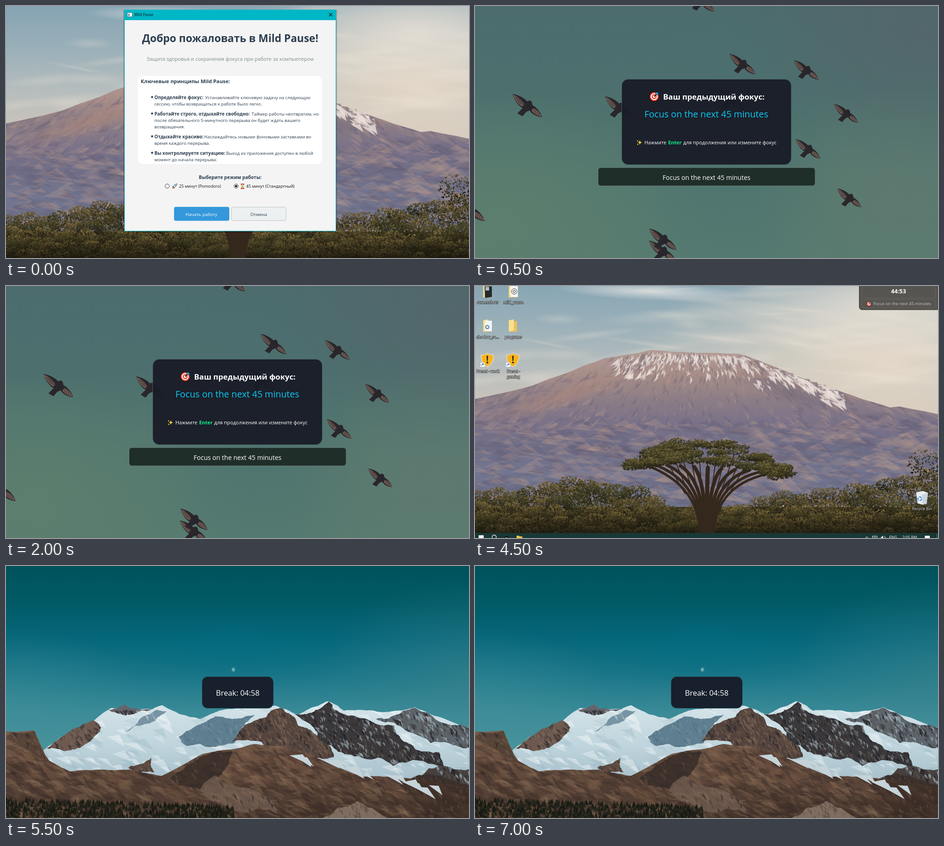
Animation of 1014 by 552 pixels, one loop 8 s. Source, as an HTML page with a canvas:

```html
<!DOCTYPE html>
<html lang="ru">
<head>
<meta charset="utf-8">
<title>Mild Pause</title>
<style>
html, body { margin: 0; width: 100%; height: 100%; overflow: hidden; background: #000; }
.scene { position: absolute; left: 0; top: 0; width: 1014px; height: 552px; overflow: hidden; }
.scene > * { position: absolute; left: 0; top: 0; }
text { font-family: "Open Sans", "Noto Sans", sans-serif; fill: #2c3e50; }
.b { font-weight: 700; }
.mid { text-anchor: middle; }
.white { fill: #fff; }
.list { font-size: 9.6px; }
.list .b { font-size: 10px; }
.icons text { font-size: 8.3px; fill: #fff; stroke: #000a; stroke-width: 1.6px; paint-order: stroke; text-anchor: middle; }
</style>
</head>
<body>

<svg width="0" height="0" style="position:absolute">
  <symbol id="dart" viewBox="0 0 24 24">
    <circle cx="11.5" cy="12.5" r="11.2" fill="#111"/>
    <circle cx="11.5" cy="12.5" r="10" fill="#f0402f"/>
    <circle cx="11.5" cy="12.5" r="6.5" fill="none" stroke="#fff" stroke-width="2.2"/>
    <circle cx="11.5" cy="12.5" r="2.8" fill="#fff"/>
    <path d="M11.5 12.5 18 6" stroke="#111" stroke-width="2"/>
    <path d="M15 8V4.500L19 1v4h4l-4 4z" fill="#35b8f0" stroke="#111"/>
  </symbol>
  <symbol id="spark" viewBox="0 0 12 12">
    <path d="M7 1 8.3 4.7 12 6 8.3 7.3 7 11 5.7 7.3 2 6 5.7 4.7z" fill="#ffdf3c"/>
    <path d="M2 1v3M.5 2.5h3M2.5 8.5v3M1 10h3" stroke="#ffdf3c"/>
  </symbol>
  <symbol id="rocket" viewBox="0 0 12 12">
    <path d="M3 6 1 8l2 .3zM6 9 4 11l-.3-2z" fill="#e2402f" stroke="#222" stroke-width=".6"/>
    <path d="M11.5.5C8 .6 5 3 3 7l2 2c4-2 6.4-5 6.5-8.5z" fill="#d9e2e8" stroke="#222" stroke-width=".8"/>
    <circle cx="8" cy="4" r="1.3" fill="#35a4e8"/>
    <path d="M3.5 8.5.8 11.2" stroke="#f2a024" stroke-width="1.6"/>
  </symbol>
  <symbol id="glass" viewBox="0 0 12 12">
    <path d="M3 1.5C3 5 5.5 5 5.5 6S3 7 3 10.5h6C9 7 6.5 7 6.5 6S9 5 9 1.5z" fill="#f8d58a" stroke="#333" stroke-width=".6"/>
    <path d="M2 1.2h8M2 10.8h8" stroke="#b8432c" stroke-width="1.8"/>
    <path d="M4 10 6 7.5 8 10z" fill="#e8992c"/>
  </symbol>
  <symbol id="folder" viewBox="0 0 22 28">
    <path d="M1 1h9l2 3h7v23H1z" fill="#e9c25c"/>
    <path d="M1 3 12 0v24L1 27z" fill="#fbe08c"/>
  </symbol>
  <symbol id="shield" viewBox="0 0 30 32">
    <path d="M15 1c4 3 9 4 13.500 4C29 17 26 26 15 31 4 26 1 17 1.500 5 6 5 11 4 15 1z" fill="#f8b31c" stroke="#d9dde0" stroke-width="1.5"/>
    <path d="M13.3 7h3.4l-.7 11h-2z" fill="#222"/><circle cx="15" cy="21.5" r="1.9" fill="#222"/>
    <path d="M0 22h9v9H0z" fill="#fff"/><path d="M2 29c0-3 1-4 4-4M4.500 23.500 7 25l-2 2" fill="none" stroke="#2469b8" stroke-width="1.2"/>
  </symbol>
</svg>

<div class="scene" data-from="0" data-art="savanna" data-shift="10">
  <svg width="1014" height="552">
    <rect x="257" y="8" width="468" height="488" fill="#0003"/>
    <rect x="259.5" y="8.5" width="463" height="484.5" fill="#f4f4f4" stroke="#00b7c6"/>
    <rect x="259" y="8" width="464" height="23" fill="#00b7c6"/>
    <rect x="265.5" y="14.5" width="11" height="9" fill="#f4f4f4" stroke="#68777c"/>
    <path d="M267 17h4v5h-4z" fill="#8298a5"/>
    <text x="281" y="22" font-size="8.2" style="fill:#0b1719">Mild Pause</text>
    <path d="M707.5 15.5l7 7m0-7l-7 7" stroke="#111" stroke-width="1.1"/>

    <text class="b mid" x="491" y="79" font-size="23">Добро пожаловать в Mild Pause!</text>
    <text class="mid" x="491" y="120" font-size="11" style="fill:#7f8c8d">Защита здоровья и сохранения фокуса при работе за компьютером</text>
    <rect x="289" y="153" width="403" height="193" rx="10" fill="#fff"/>
    <text class="b" x="295" y="169" font-size="11.3">Ключевые принципы Mild Pause:</text>
    <g fill="#2c3e50"><circle cx="320" cy="199.500" r="2.2"/><circle cx="320" cy="235.500" r="2.2"/><circle cx="320" cy="285.500" r="2.2"/><circle cx="320" cy="321.500" r="2.2"/></g>
    <g class="list">
      <text class="b" x="325" y="204">Определяйте фокус:</text><text x="436" y="204">Устанавливайте ключевую задачу на следующую</text>
      <text x="325" y="218">сессию, чтобы возвращаться к работе было легко.</text>
      <text class="b" x="325" y="240">Работайте строго, отдыхайте свободно:</text><text x="538" y="240">Таймер работы неотвратим, но</text>
      <text x="325" y="254">после обязательного 5-минутного перерыва он будет ждать вашего</text>
      <text x="325" y="268">возвращения.</text>
      <text class="b" x="325" y="290">Отдыхайте красиво:</text><text x="434" y="290">Наслаждайтесь новыми фоновыми заставками во</text>
      <text x="325" y="304">время каждого перерыва.</text>
      <text class="b" x="325" y="326">Вы контролируете ситуацию:</text><text x="482" y="326">Выход из приложения доступен в любой</text>
      <text x="325" y="340">момент до начала перерыва.</text>
    </g>
    <text class="b mid" x="491" y="379" font-size="10.15">Выберите режим работы:</text>
    <g fill="#fff" stroke="#333"><circle cx="353" cy="394.5" r="4.6"/><circle cx="504" cy="394.5" r="4.6"/></g>
    <circle cx="504" cy="394.5" r="2.6" fill="#222"/>
    <use href="#rocket" x="363" y="389" width="12" height="12"/>
    <use href="#glass" x="512" y="389" width="12" height="12"/>
    <g font-size="9"><text x="379" y="398" style="fill:#111">25 минут (Pomodoro)</text><text x="526" y="398" style="fill:#111">45 минут (Стандартный)</text></g>
    <rect x="368" y="440" width="121" height="30.5" rx="4" fill="#3498db"/>
    <rect x="493.5" y="440.5" width="120" height="29.5" rx="4" fill="#ecf0f1" stroke="#bdc3c7"/>
    <g class="mid" font-size="9.8"><text class="white" x="428" y="459.5">Начать работу</text><text x="553.5" y="459.5">Отмена</text></g>
  </svg>
</div>

<div class="scene" data-from="500" data-art="flock">
  <svg width="1014" height="552">
    <rect x="321.5" y="160.5" width="371" height="187" rx="14" fill="#191c26" fill-opacity=".95" stroke="#46545a"/>
    <use href="#dart" x="381" y="186" width="24" height="24"/>
    <text class="b white" x="412" y="205" font-size="16.8">Ваш предыдущий фокус:</text>
    <text class="mid" x="506.5" y="244" font-size="19.8" style="fill:#0cc8f4">Focus on the next 45 minutes</text>
    <use href="#spark" x="354" y="293" width="12" height="12"/>
    <g font-size="10.9"><text class="white" x="371" y="303">Нажмите</text><text class="b" x="423" y="303" style="fill:#0cf28b">Enter</text><text class="white" x="456" y="303">для продолжения или измените фокус</text></g>
    <rect x="269.5" y="354" width="475.5" height="40" rx="6" fill="#1f2b28" fill-opacity=".96" stroke="#6b7f7a"/>
    <text class="mid white" x="507" y="380.5" font-size="14.05">Focus on the next 45 minutes</text>
  </svg>
</div>

<div class="scene" data-from="3000" data-art="savanna" data-shift="0">
  <svg width="1014" height="552">
    <rect x="841.5" y="-8" width="180" height="60" rx="6" fill="#514e4b" fill-opacity=".95" stroke="#35332f"/>
    <g fill="none" stroke="#67635f"><rect x="847.5" y="-5" width="161" height="31" rx="4"/><rect x="847.5" y="29.5" width="161" height="18" rx="4"/></g>
    <text class="b mid white" x="927.5" y="15.5" font-size="12.8">44:53</text>
    <use href="#dart" x="857" y="33" width="12" height="12"/>
    <text x="872.5" y="42" font-size="9.2" style="fill:#c8c4c0">Focus on the next 45 minutes</text>
    <g class="icons">
      <use href="#folder" x="17" y="-2" width="22" height="28"/><path d="M21 1h16v23l-15 2z" fill="#25292b"/><path d="M23 2h8v8h-8z" fill="#a9bccb"/>
      <use href="#folder" x="73" y="-2" width="22" height="28"/><path d="M78 0h16v24H78z" fill="#f4f4f2"/>
      <g fill="none" stroke="#333"><circle cx="86" cy="12" r="6"/><circle cx="86" cy="12" r="2.5"/></g>
      <use href="#folder" x="17" y="73" width="22" height="28"/><path d="M22 76h15v23H22z" fill="#f1f5f8"/><circle cx="27" cy="90" r="3.5" fill="none" stroke="#4b7fa8" stroke-width="2"/>
      <use href="#folder" x="73" y="73" width="22" height="28"/>
      <use href="#shield" x="12" y="146" width="30" height="32"/><use href="#shield" x="68" y="146" width="30" height="32"/>
      <text x="28" y="39">screenshots</text><text x="84" y="39">mild_pause</text>
      <text x="28" y="115">shodow_so...</text><text x="84" y="115">programs</text>
      <text x="28" y="190">Preset - work</text><text x="84" y="190">Preset -</text><text x="84" y="201.5">gaming</text>
      <path d="M966 452l15-3 11 4-3 24-9 2-11-3z" fill="#e6ecf0"/><path d="M979 457l13-4-3 24-9 2z" fill="#c9d3da"/>
      <circle cx="974" cy="466" r="4" fill="none" stroke="#2f87d8" stroke-width="2.2" stroke-dasharray="6 2.4"/>
      <text x="979" y="491">Recycle Bin</text>
    </g>
    <rect y="541" width="1014" height="11" fill="#193835"/>
    <rect x="8" y="546" width="11" height="11" fill="#fff"/>
    <g fill="none" stroke="#fff"><circle cx="42" cy="550" r="4.5" stroke-width="1.3"/><path d="M855 552l3-3 3 3M870.5 554v-6h10v6M873 551h5M897 548q3 3 0 6"/></g>
    <path d="M888 550h2l4-3v8zM985 547h11v6h-11z" fill="#fff"/>
    <circle cx="69" cy="552" r="4.5" fill="#111"/><path d="M67 551h4v1h-4z" fill="#fff"/>
    <path d="M91 547h5l1.5 1.5h6V553H91z" fill="#f5c84c"/>
    <g font-size="8.5"><text class="white" x="907" y="554">ENG</text><text class="white" x="936" y="554">2:05 PM</text></g>
    <path d="M1011.5 542v10" stroke="#55706c"/>
  </svg>
</div>

<div class="scene" data-from="5500" data-art="alps">
  <svg width="1014" height="552">
    <rect x="429.5" y="242.5" width="156" height="69" rx="12" fill="#17202c" stroke="#284b5a"/>
    <text class="mid white" x="507.5" y="284" font-size="16.6">Break: 04:58</text>
  </svg>
</div>

<script>
const W = 1014, H = 552, LOOP = 8000;

const random = seed => () => (seed = seed * 16807 % 2147483647) / 2147483647;
const pick = (rnd, list) => list[Math.floor(rnd() * list.length)];

function gradient(c, y0, y1, ...stops) {
  const g = c.createLinearGradient(0, y0, 0, y1);
  stops.forEach((s, i) => g.addColorStop(i / (stops.length - 1), s));
  return g;
}

function glow(c, x, y, rx, ry, color, turn = 0) {
  c.save();
  c.translate(x, y);
  c.rotate(turn);
  c.scale(rx, ry);
  const g = c.createRadialGradient(0, 0, 0, 0, 0, 1);
  g.addColorStop(0, color);
  g.addColorStop(1, color.slice(0, 7) + '00');
  c.fillStyle = g;
  c.fillRect(-1, -1, 2, 2);
  c.restore();
}

// Height of a line through key points at x.
function heightAt(points, x) {
  const i = Math.max(1, points.findIndex(p => p[0] >= x));
  const [x0, y0] = points[i - 1], [x1, y1] = points[i];
  return y0 + (y1 - y0) * (x - x0) / (x1 - x0);
}

// Closed outline broken up by midpoint displacement.
function outline(rnd, points, rough) {
  for (let level = 0; level < 4; level++) {
    points = points.flatMap(([x, y], i) => {
      const [u, v] = points[(i + 1) % points.length];
      const bend = Math.hypot(u - x, v - y) * rough;
      return [[x, y], [(x + u) / 2 + (rnd() - .5) * bend, (y + v) / 2 + (rnd() - .5) * bend]];
    });
  }
  return new Path2D('M' + points.join('L') + 'Z');
}

// One lit or shaded sliver of a slope.
function facet(c, rnd, x, y, [dx, dy], size, color) {
  const k = size * (.3 + rnd()), w = k * (.15 + rnd() * .25);
  dx += (rnd() - .5) * .8;
  c.fillStyle = color;
  c.beginPath();
  c.moveTo(x, y);
  c.lineTo(x + dx * k, y + dy * k);
  c.lineTo(x + dx * k * .5 + dy * w, y + dy * k * .5 - dx * w);
  c.fill();
}

function mass(c, rnd, points, fill, tones, { count = 500, size = 14, dir = () => [.6, 1], rough = .25 } = {}) {
  const xs = points.map(p => p[0]), ys = points.map(p => p[1]);
  const left = Math.min(...xs), top = Math.min(...ys);
  const wide = Math.max(...xs) - left, tall = Math.max(...ys) - top;
  const path = outline(rnd, points, rough);
  c.fillStyle = fill;
  c.fill(path);
  c.save();
  c.clip(path);
  for (let i = 0; i < count; i++) {
    const x = left + rnd() * wide, y = top + rnd() * tall;
    facet(c, rnd, x, y, dir(x, y), size, pick(rnd, tones));
  }
  c.restore();
}

// Leafy ellipse; tones run from lit top to shaded bottom.
function leaves(c, rnd, x, y, rx, ry, tones, density) {
  for (let n = rx * ry * density; n > 0; n--) {
    const a = rnd() * 6.283, r = Math.sqrt(rnd());
    const shade = (Math.sin(a) * r + 1) * .35 + rnd() * .3;
    c.fillStyle = tones[Math.floor(shade * tones.length)];
    c.beginPath();
    c.ellipse(x + Math.cos(a) * r * rx, y + Math.sin(a) * r * ry, .8 + rnd() * 1.8, .6 + rnd(), rnd() * 3, 0, 6.3);
    c.fill();
  }
}

function savanna(c, shift) {
  const rnd = random(77);
  c.translate(0, shift);

  c.fillStyle = gradient(c, -10, 270, '#86a4b3', '#9ab0b9', '#b6bdbd', '#cdc4ba');
  c.fillRect(0, -20, W, 600);
  glow(c, 900, 160, 560, 230, '#e6d8c6f0');
  glow(c, 900, 50, 330, 130, '#e6dfd5e0');
  glow(c, 385, 12, 210, 20, '#dfe1dfe0', .04);
  for (let i = 0; i < 130; i++) {
    const x = rnd() * W, y = rnd() * 220, cover = (x / W + y / 220) / 2;
    if (rnd() < cover) glow(c, x, y, 40 + rnd() * 110, 4 + rnd() * 16, '#ebe1d448', rnd() * .4 - .2);
  }

  const ridge = [[-20, 252], [120, 220], [282, 159], [385, 140], [580, 149], [660, 178], [770, 222], [908, 266], [930, 264], [1040, 286]];
  const fall = (x, y) => y < 300 ? [(x - 480) / 200, 1] : [3, .35];
  mass(c, rnd, [...ridge, [1040, 490], [-20, 490]],
    gradient(c, 140, 460, '#b39c96', '#a78d88', '#8d7e86', '#7a7288', '#706f88', '#737690', '#6d728c'),
    ['#b8978a48', '#5f5a7040', '#a08c8c48', '#66637c48'], { count: 2400, size: 17, dir: fall, rough: .03 });
  glow(c, 180, 245, 200, 28, '#b2897988', -.3);
  glow(c, 690, 235, 130, 24, '#6a647690', .35);
  for (let i = 0; i < 620; i++) {
    const x = 310 + rnd() * 480, y = ridgeDepth(x);
    facet(c, rnd, x, y, fall(x, y), 17, pick(rnd, ['#ece2dccc', '#dccfcbb8', '#e3d8d2c0', '#87757a98']));
  }
  function ridgeDepth(x) {
    return heightAt(ridge, x) + 2 + rnd() * rnd() * (x < 650 ? 62 : 35);
  }

  // Scrub, painted back to front under a rough treeline
  const treeline = [[-30, 445], [110, 446], [180, 418], [250, 420], [360, 445], [430, 482], [540, 492], [640, 458], [780, 444], [890, 425], [1050, 400]];
  const scrub = [['#706238', '#574c2b', '#423b21', '#2f2a18', '#1f1c11'], ['#5d5632', '#474326', '#34321c', '#272516', '#1b1a10'], ['#7d6a3b', '#5f5230', '#453c24', '#312b1a', '#211d12']];
  c.fillStyle = gradient(c, 475, 541, '#3a3420', '#1f1b11');
  c.fillRect(0, 484, W, 80);
  for (let row = 0; row < 6; row++) {
    for (let x = -20; x < W + 30; x += 28 + rnd() * 20) {
      const top = heightAt(treeline, x) + 12;
      leaves(c, rnd, x, top + (535 - top) * row / 5 + rnd() * 12, 18 + rnd() * 18, 13 + rnd() * 12, pick(rnd, scrub), .5);
    }
  }
  leaves(c, rnd, 985, 390, 38, 32, scrub[1], .16);
  c.fillStyle = gradient(c, 495, 545, '#16140b00', '#16140bb8');
  c.fillRect(0, 495, W, 65);

  // Umbrella tree: fanned limbs, then layered foliage
  c.strokeStyle = '#34271c';
  c.lineCap = 'round';
  for (let u = -1; u <= 1; u += .2) {
    c.lineWidth = 9 - 4 * Math.abs(u);
    c.stroke(new Path2D(`M${508 + u * 14} 565Q${508 + u * 8} 430 ${510 + u * 150} ${398 + u * 10}`));
    c.lineWidth = 2;
    c.stroke(new Path2D(`M${508 + u * 48} 455Q${508 + u * 70} 420 ${510 + u * 95} 370`));
  }
  for (let i = 0; i < 100; i++) {
    const u = rnd() * 2 - 1, crown = 338 + 55 * Math.abs(u) ** 2.2 + 10 * u;
    leaves(c, rnd, 509 + u * 170, crown + i / 100 * (50 - 28 * u * u), 16 + rnd() * 14, 4 + rnd() * 5,
      ['#6f643a', '#504a2a', '#3c3920', '#2c2918', '#211e13'], .65);
  }
}

function bird(c, x, y, span) {
  c.save();
  c.translate(x, y);
  c.rotate(.13);
  c.scale(span / 82, span / 82);
  c.fillStyle = '#29262b';
  c.fill(new Path2D('M-36-22C-24-22-10-17-2-10Q4-15 8-10L11-3C20 0 31 10 35 20 24 21 12 17 6 9L-1 13-8 24-20 19-10 6C-20 3-31-10-36-22Z'));
  c.fillStyle = '#6d5a53';
  c.fill(new Path2D('M-35-21C-24-18-14-11-8-4L-11 3C-20 0-30-10-35-21ZM13 3C23 5 31 13 34 19 24 19 15 15 10 9Z'));
  c.strokeStyle = '#3a3233';
  for (let k = 0; k < 4; k++) c.stroke(new Path2D(`M${-30 + k * 4} ${-17 + k}l14 15M${15 + k * 4} ${4 + k * 2}l1 10`));
  c.restore();
}

function flock(c) {
  c.fillStyle = gradient(c, 0, H, '#4c6c6d', '#4d706e', '#54786f', '#577b70');
  c.fillRect(0, 0, W, H);
  glow(c, 980, 60, 420, 300, '#55636ab0');
  glow(c, 930, 430, 330, 260, '#617a70c0');
  glow(c, 60, 470, 380, 280, '#5f806ec0');
  glow(c, 560, 330, 230, 330, '#48706f90');
  const places = [[115, 219], [316, 223], [586, 128], [726, 141], [813, 236], [730, 314], [820, 421], [411, 538], [412, 512], [-12, 446], [495, -10], [560, 206]];
  places.forEach(([x, y]) => bird(c, x, y, 84 - x * .022));
}

function alps(c) {
  const rnd = random(31);
  c.fillStyle = gradient(c, 0, 400, '#00525c', '#015a66', '#05677a', '#1c7788', '#3a8a97', '#4a949c');
  c.fillRect(0, 0, W, H);
  glow(c, 0, 300, 300, 170, '#43909b70');
  glow(c, 1014, 230, 330, 200, '#45858f70');
  glow(c, 500, 190, 300, 90, '#006c8270');
  glow(c, 498, 227, 5, 6, '#a5c8cc');

  const ice = ['#f2f8f958', '#8fadbc48', '#ffffff58', '#a9c1cc48'];
  const rock = ['#2c282aa0', '#8a715f70', '#50433f90', '#6d584d80'];
  const slate = ['#1f2026b0', '#5d534e90', '#34323790', '#a9bac290'];
  const earth = ['#8f715948', '#41322a58', '#735645 50'.replace(' ', ''), '#34292450'];

  mass(c, rnd, [[60, 425], [190, 340], [230, 311], [320, 314], [342, 305], [425, 335], [480, 314], [590, 306], [640, 325], [705, 296], [740, 317], [830, 320], [895, 309], [1040, 368], [1040, 500], [85, 500]],
    gradient(c, 300, 480, '#d5e4e9', '#c0d5dd', '#a5bec9'), ice, { size: 22, dir: () => [1.6, .8], rough: .1 });
  mass(c, rnd, [[262, 362], [330, 315], [352, 318], [310, 345]], '#7894a4', ice, { count: 30 });
  mass(c, rnd, [[378, 374], [470, 330], [545, 326], [500, 388], [400, 394]], '#5f7f90', ['#49687a70', '#84a0ae60'], { count: 90 });

  mass(c, rnd, [[85, 400], [190, 338], [208, 354], [150, 402]], '#6e5b52', rock, { count: 260 });
  mass(c, rnd, [[222, 314], [320, 314], [262, 327]], '#65646a', slate, { count: 90 });
  mass(c, rnd, [[268, 442], [318, 420], [325, 452]], '#5c493f', rock, { count: 60 });
  mass(c, rnd, [[495, 385], [530, 345], [600, 311], [640, 350], [684, 372], [718, 418], [600, 405]], '#54443d', rock, { count: 900 });
  mass(c, rnd, [[632, 324], [706, 297], [742, 325], [850, 350], [895, 400], [948, 408], [960, 440], [775, 418], [690, 385]], '#3b383a', slate, { count: 1300, size: 12 });
  mass(c, rnd, [[810, 335], [895, 310], [1030, 364], [1030, 398], [930, 388]], '#5d656b', slate, { count: 420 });
  mass(c, rnd, [[880, 470], [950, 436], [1030, 450], [1030, 500]], '#47413e', slate, { count: 200 });

  mass(c, rnd, [[-20, 364], [62, 360], [95, 427], [140, 450], [270, 446], [340, 460], [430, 412], [545, 390], [650, 405], [780, 462], [930, 470], [1040, 494], [1040, 580], [-20, 580]],
    gradient(c, 365, 552, '#765c4c', '#694f40', '#594338', '#43342b'), earth, { count: 2600, size: 24, dir: () => [1.5, .75], rough: .07 });
  mass(c, rnd, [[358, 466], [440, 414], [495, 405], [480, 445], [430, 490]], '#342b28c8', earth, { count: 60 });
  mass(c, rnd, [[-10, 375], [62, 362], [95, 428], [50, 405]], '#4b3b31a0', rock, { count: 120 });
  mass(c, rnd, [[860, 482], [1040, 480], [1040, 560], [930, 552]], '#372a25b0', earth, { count: 100 });
  mass(c, rnd, [[425, 490], [460, 459], [520, 485], [600, 545]], '#7a6558a0', rock, { count: 130 });
  mass(c, rnd, [[680, 556], [770, 515], [840, 556]], '#7f6d61', earth, { count: 90 });
  for (let i = 0; i < 16; i++) facet(c, rnd, 600 + i * 20 + rnd() * 30, 400 + i * 5 + rnd() * 15, [1.4, .8], 26, '#c5d3d8');

  for (let i = 0; i < 900; i++) {
    const x = rnd() * 500, y = 512 + x * .03 + rnd() * 42;
    c.fillStyle = pick(rnd, ['#25261b', '#171a14', '#1f2118']);
    c.fill(new Path2D(`M${x} ${y - 8}l3 10h-6z`));
  }
}

const painters = { savanna, flock, alps };

// Each scene covers the ones before it once its time comes.
document.querySelectorAll('.scene').forEach(scene => {
  const { from, art, shift } = scene.dataset;
  const canvas = document.createElement('canvas');
  canvas.width = W;
  canvas.height = H;
  scene.prepend(canvas);
  painters[art](canvas.getContext('2d'), +shift);
  if (+from) {
    const steps = [{ opacity: 0, easing: 'step-end' }, { opacity: 1, offset: from / LOOP }, { opacity: 1 }];
    scene.animate(steps, { duration: LOOP, iterations: Infinity });
  }
});
</script>
</body>
</html>
```
